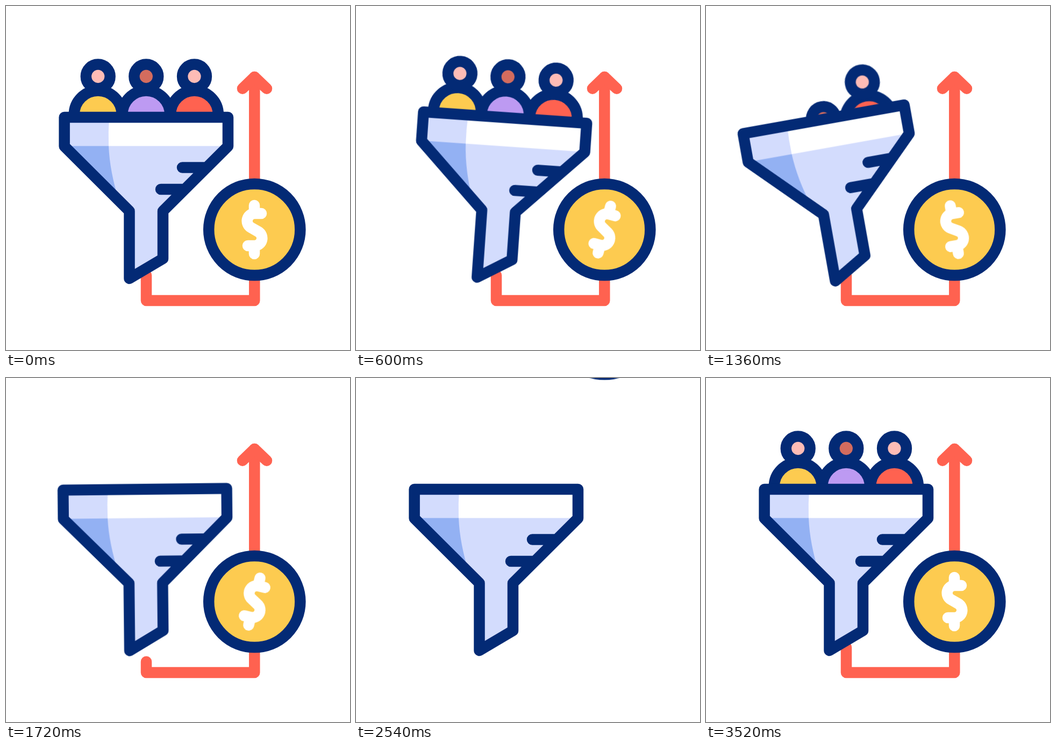
An HTML page that plays this animation: 640 by 640 pixels, repeating every 3.62 s.

```html
<!DOCTYPE html>
<html lang="en">
<head>
<meta charset="utf-8">
<title>Sales funnel</title>
<style>
  html, body { margin: 0; width: 100%; height: 100%; overflow: hidden; background: #fff; }
  svg { display: block; width: 100vw; height: 100vh; }

  .line { fill: none; stroke: #ff6250; stroke-width: 20.5; stroke-linecap: round; stroke-linejoin: round; }
  .ink { stroke: #032a75; stroke-width: 20.5; stroke-linecap: round; stroke-linejoin: round; }

  .anim { animation: 3.62s cubic-bezier(.333, 0, .667, 1) infinite; }
  .tilt { animation-name: tilt; transform-origin: 261px 446px; }
  .p1 { animation-name: drop1; --dx: 37.4px; }
  .p2 { animation-name: drop2; --dx: 0px; }
  .p3 { animation-name: drop3; --dx: -37.4px; }
  .coin { animation-name: lift, ghost; }
  .swing { animation-name: swing; transform-origin: 462.3px 416px; }
  .arrow { animation-name: leave; }
  .trail { animation-name: trail, blank; stroke-dasharray: 1 3; }
  .head { animation-name: head; transform-origin: 462.3px 132px; }

  @keyframes tilt {
    0%, 49.724%, 100% { transform: rotate(0deg); }
    16.575% { transform: rotate(4deg); }
    33.149% { transform: rotate(-12.3deg); }
  }
  @keyframes drop1 {
    0%, 22.099%, 96.685%, 100% { transform: translate(0px, 0px); }
    38.674%, 80.11% { transform: translate(var(--dx), 115px); }
  }
  @keyframes drop2 {
    0%, 27.624%, 91.16%, 100% { transform: translate(0px, 0px); }
    44.199%, 74.586% { transform: translate(var(--dx), 115px); }
  }
  @keyframes drop3 {
    0%, 33.149%, 85.635%, 100% { transform: translate(0px, 0px); }
    49.724%, 69.061% { transform: translate(var(--dx), 115px); }
  }
  @keyframes swing {
    0%, 82.873%, 100% { transform: rotate(0deg); }
    16.575%, 49.724% { transform: rotate(15deg); }
    33.149%, 66.298% { transform: rotate(-15deg); }
  }
  @keyframes lift {
    0%, 58.011%, 74.586%, 100% { transform: translateY(0px); }
    74.58% { transform: translateY(-614px); }
  }
  @keyframes ghost {
    0%, 74.58%, 96.685%, 100% { opacity: 1; }
    74.586%, 89.503% { opacity: .27; }
  }
  @keyframes leave {
    0%, 60.773%, 77.348%, 100% { transform: translateY(0px); }
    77.34% { transform: translateY(-780px); }
  }
  @keyframes trail {
    0%, 44.199%, 96.685%, 100% { stroke-dashoffset: 0; }
    71.823% { stroke-dashoffset: -1; }
    71.83%, 80.11% { stroke-dashoffset: 1; }
  }
  @keyframes blank {
    0%, 71.82%, 80.115%, 100% { opacity: 1; }
    71.823%, 80.11% { opacity: 0; }
  }
  @keyframes head {
    0%, 77.34%, 96.685%, 100% { transform: scale(1); }
    77.345%, 94.751% { transform: scale(0); }
  }
</style>
</head>
<body>
<svg viewBox="0 0 640 640">
  <defs>
    <clipPath id="rim"><path d="M0-100H640V207H0Z"/></clipPath>
    <g id="person" class="ink">
      <circle cy="202" r="44.4"/>
      <circle cy="131" r="22.4" style="fill: var(--skin)"/>
    </g>
  </defs>

  <g class="anim arrow">
    <path class="line anim trail" pathLength="1" d="M261 501V548H462.3V132"/>
    <path class="line anim head" d="M440 153.7L462.3 132L485 153.7"/>
  </g>

  <g class="anim coin">
    <circle class="ink" cx="462.3" cy="416" r="85.1" fill="#fdcb50"/>
    <path class="anim swing" fill="none" stroke="#fff" stroke-width="20.5" stroke-linecap="round" stroke-linejoin="round"
      d="M475 386H462A14 14 0 0 0 455.5 412L469.5 420A14 14 0 0 1 463 446H450M462 371V386M462 446V461"/>
  </g>

  <g class="anim tilt">
    <g clip-path="url(#rim)">
      <g class="anim p1"><use href="#person" x="171.2" fill="#fdcb50" style="--skin: #febcb6"/></g>
      <g class="anim p2"><use href="#person" x="260.8" fill="#bd9af2" style="--skin: #d46c5e"/></g>
      <g class="anim p3"><use href="#person" x="350.5" fill="#ff6250" style="--skin: #febcb6"/></g>
    </g>
    <path fill="#d3dcfd" d="M108.6 207H413V261L292 381.5V470L229.5 507V381.5L108.6 261Z"/>
    <path fill="#fff" d="M192 207H413V260.5H191Q190 234 192 207Z"/>
    <path fill="#93b1f3" d="M108.6 260.5H191Q193 308 210 361.5Z"/>
    <path class="ink" fill="none" d="M108.6 207H413V261L292 381.5V470L229.5 507V381.5L108.6 261ZM328 300.5H373M288 341H332"/>
  </g>
</svg>
</body>
</html>
```
